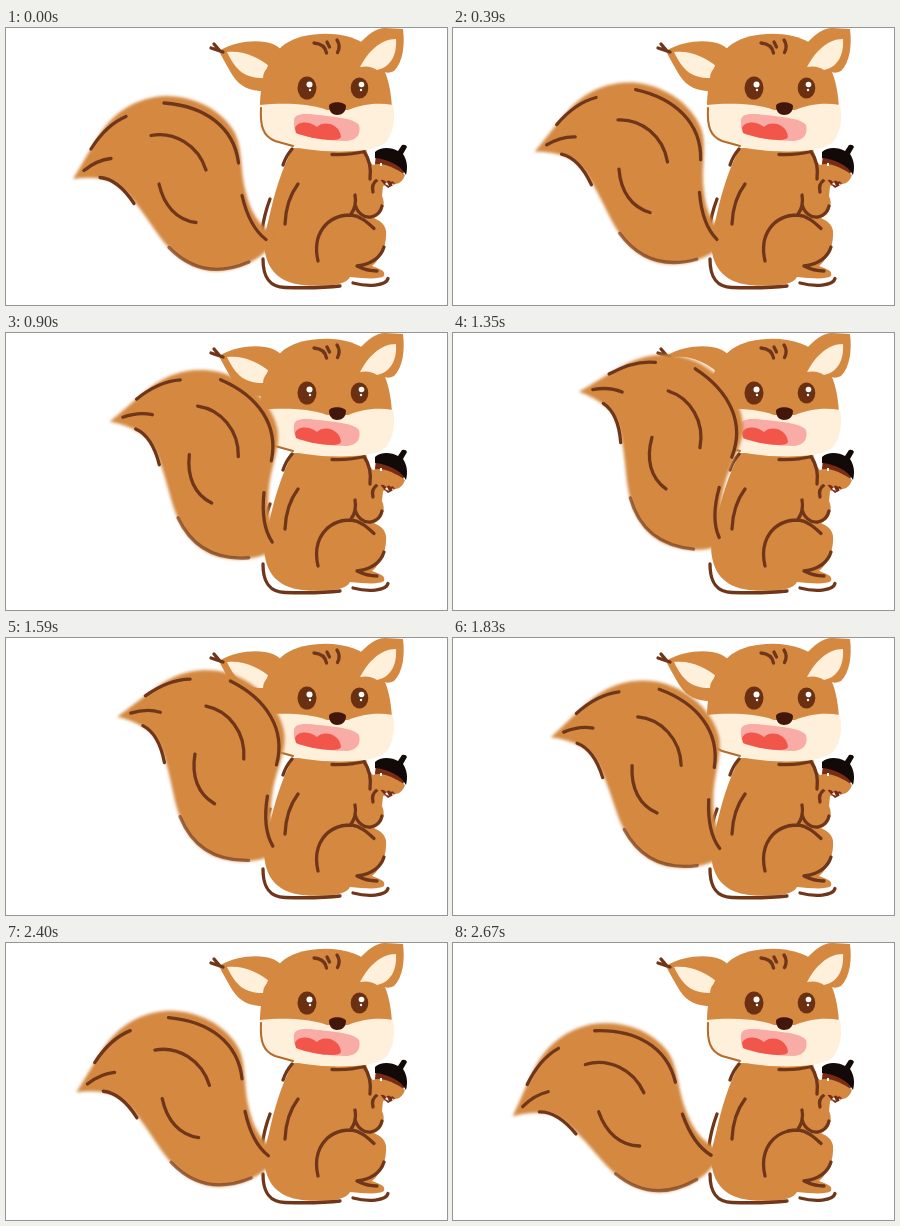
An HTML page for the animation above (2.7 s loop, 441 by 277 pixels).

```html
<!DOCTYPE html>
<html lang="en">
<head>
<meta charset="utf-8">
<title>Squirrel wagging its tail</title>
<style>
html, body { margin: 0; width: 100%; height: 100%; overflow: hidden; background: #fff; }
svg { display: block; width: 100vw; height: 100vh; }
.fur { fill: #d48840; }
.cream { fill: #fff0dc; }
.dark { fill: #6b3012; }
.line { fill: none; stroke: #70361a; stroke-width: 3.3; stroke-linecap: round; stroke-linejoin: round; }
.jaw { stroke: #b46a2b; stroke-width: 2; }
.faint { opacity: .65; }
</style>
</head>
<body>
<svg viewBox="0 0 441 277">
  <defs>
    <filter id="soft" x="-10%" y="-10%" width="120%" height="120%"><feGaussianBlur stdDeviation="1.4"/></filter>
    <path id="tailShape" d="M67 151C75 138 83 123 92 109C107 84 131 69 160 68C190 68 217 83 229 105C237 122 234 144 240 165C245 185 253 196 264 204C267 211 266 218 259 224C248 235 228 243 208 243C182 241 165 225 151 205C137 185 124 164 107 154C95 149 81 149 67 151Z"/>
  </defs>

  <g id="body">
    <path class="fur" d="M287 120C276 140 268 166 263 190C259 205 257 215 259 224C262 241 272 254 296 257C316 259 340 258 344 249C357 250 372 252 378 248C380 242 373 241 366 238C376 230 381 215 380 203C379 196 374 193 368 190C377 187 380 176 376 168L377 158L385 156L364 134L360 121Z"/>
    <path class="line" d="M277 137Q280 128 286 121M326 126.500Q346 127 358 123.500Q366 135 364 151M292 156Q280 172 279 196M264 171Q258 187 256 203M257 231C257 249 263 259 279 259.500C298 260 318 260 334 258"/>
    <path class="line" d="M312 233C306 207 320 187 345 187C355 188 362 195 368 200.500M378 219Q373 235 351 238Q361 243 371 243M347 255C362 259 380 258 382 250.500M349 167Q351 178 345 186M349 176C351 185 358 190 365 189Q374 187 376 178M371 152Q365 156 367 164"/>
  </g>

  <g id="acorn">
    <path fill="#7a2b13" d="M371 126C366 137 371 151 382 160C394 155 400 144 400 134Z"/>
    <path fill="#120a08" d="M369 124C374 119 385 119 392 123L396 117Q400 116 401 119L397 126C401 132 402 139 400 147C395 137 381 131 369 130Z"/>
    <path class="fur" d="M367 137C375 134 388 139 399 147C397 153 393 156 389 156Q387 152 385 154Q383 151 380 154Q377 150 373 153Q366 149 367 137Z"/>
    <path fill="#fff" d="M374 135h2v3h-2zM381 154l2 4-4-2zM387 155l1 3-2-1z"/>
  </g>

  <g id="head">
    <path class="fur" d="M213 23C228 14 246 12 259 14Q269 15 277 23L264 63C246 64 235 60 227 48C221 38 217 31 213 23Z"/>
    <path class="cream" d="M221 24C238 22 254 30 264 39Q257 42 257 50C239 50 230 43 221 24Z"/>
    <path class="line" d="M205 20L217 24M208 16L214 23"/>
    <path class="fur" d="M254 84C253 55 261 29 279 16C298 3 337 2 357 15C377 29 385 53 386 82Z"/>
    <path class="fur" d="M352 17C361 7 370 0 379 0L397 1C399 17 397 34 388 43Q381 47 374 42Z"/>
    <path class="cream" d="M390 11C374 11 362 24 354 39Q364 37 371 42C385 39 391 27 390 11Z"/>
    <path class="cream" d="M254 77C274 75 302 75 321 82L342 82C354 77 370 74 387 77C390 91 387 107 379 115C367 124 341 124 316 123C293 121 270 116 259 108C254 101 254 88 254 77Z"/>
    <path class="line jaw" d="M255 80C254 98 257 108 269 113L287 118"/>
    <path class="line" d="M308 15Q319 16 320.500 25M321 14L323.500 19M331 12Q335 18 331.500 24.500"/>
    <ellipse class="dark" cx="301" cy="60" rx="9.500" ry="11.500"/>
    <ellipse class="dark" cx="353.500" cy="60" rx="8.800" ry="10.500"/>
    <g fill="#fff">
      <circle cx="303.500" cy="56.500" r="3"/><circle cx="304" cy="62" r="1.200"/>
      <circle cx="355.500" cy="56.500" r="2.800"/><circle cx="355" cy="62" r="1.200"/>
    </g>
    <path fill="#43160c" d="M323 78C324 73 338 73 340 78C340 84 336 87 331 87C326 87 323 83 323 78Z"/>
    <path fill="#f9aca5" d="M288 92C289 84 302 86 313 87C328 89 348 90 353 97C355 105 352 112 341 113C323 113 304 110 292 106Q287 102 288 92Z"/>
    <path fill="#f25549" d="M289 100C291 94 302 92 311 99C318 92 334 96 335 109Q334 112 326 112C313 112 298 108 290 105Z"/>
  </g>

  <g id="tail">
    <use href="#tailShape" class="fur" filter="url(#soft)"/>
    <path class="line" d="M85 121Q100 97 120 88.500M158 75C199 78 228 99 232.500 135M145 107.500C168 103 192 117 200 142M78 142.500Q91 132 105 130.500M94 149.500Q112 151 128 175.500M153 156C158 178 171 192 190 194.500M236 167.500C241 189 250 204 260 211.500"/>
    <path class="line faint" d="M163 219.500C186 243 213 247 243 234"/>
  </g>
</svg>
<script>
const tail = document.getElementById('tail');
const LOOP = 2700, HALF = LOOP / 2, STEP = 30;

// Tail centre and turn at the start, the top and the end of the swing
const REST = { x: 165, y: 155, turn: 0 };
const HIGH = { x: 210, y: 109.3, turn: 28.7 };
const LOW = { x: 156.3, y: 167.8, turn: -7.1 };

const mix = (a, b, p) => a + (b - a) * p;

function draw(ms) {
  const t = Math.floor((ms % LOOP) / STEP) * STEP;
  const [from, to] = t < HALF ? [REST, HIGH] : [HIGH, LOW];
  const p = (t % HALF) / HALF;
  const x = mix(from.x, to.x, p), y = mix(from.y, to.y, p);
  const turn = mix(from.turn, to.turn, p);
  tail.setAttribute('transform',
    `translate(${x} ${y}) rotate(${turn}) translate(${-REST.x} ${-REST.y})`);
}

let start;
function tick(now) {
  start ??= now;
  draw(now - start);
  requestAnimationFrame(tick);
}
draw(0);
requestAnimationFrame(tick);
</script>
</body>
</html>
```
